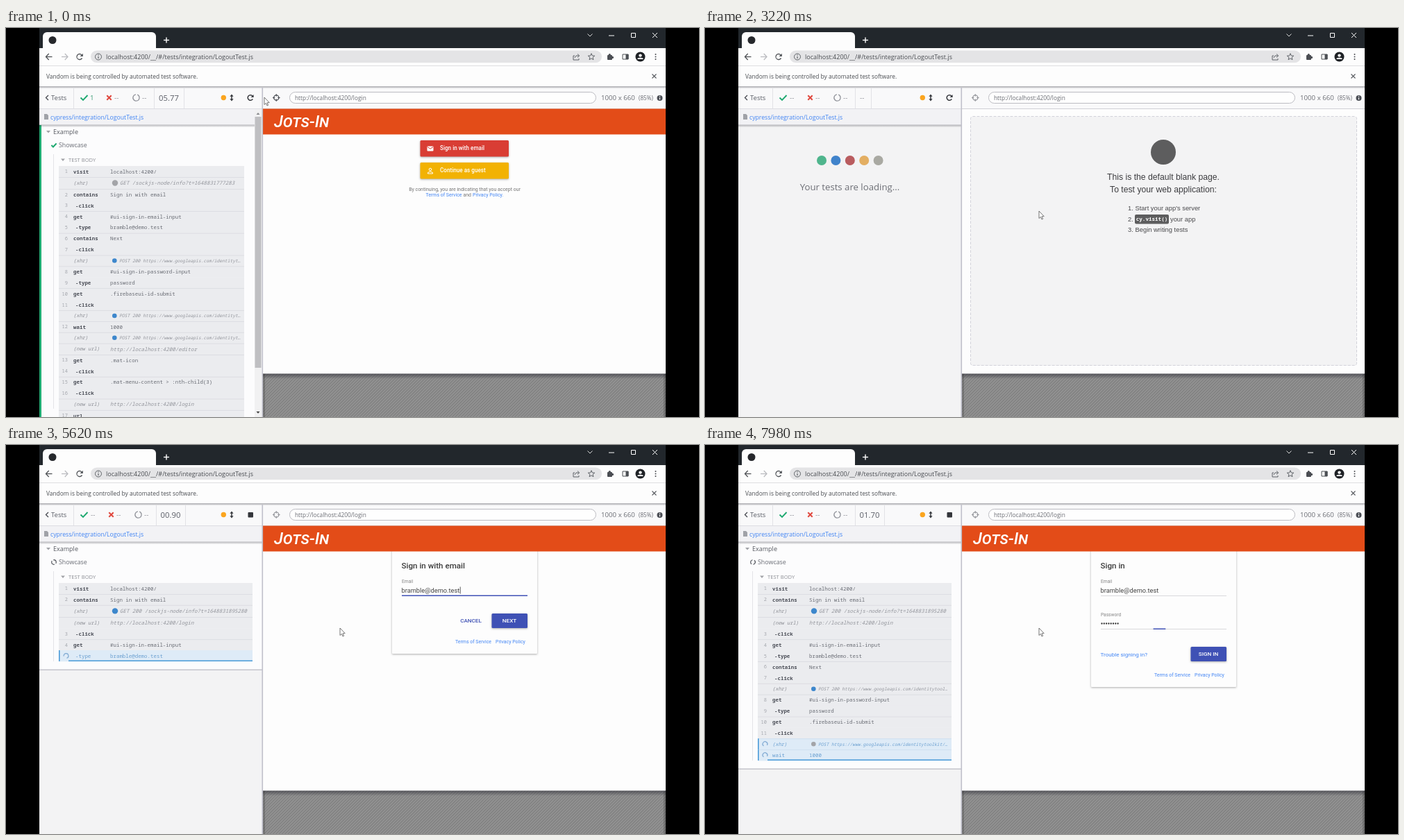
Write an HTML page with a canvas that moves like this. It is 998 px wide and 561 px high and loops after 8000 ms.

```html
<!DOCTYPE html>
<html lang="en">
<head>
<meta charset="utf-8">
<title>Test runner</title>
<style>
html, body { margin: 0; width: 100%; height: 100%; overflow: hidden; background: #000; }
canvas { display: block; }
</style>
</head>
<body>
<canvas id="stage" width="998" height="561"></canvas>
<script>
const c = document.getElementById('stage').getContext('2d');
const LOOP = 8000, HOVER = 1350, RELOAD = 2280, START = 3720, LOADED = 4700, FORM = 4950, PASSWORD = 7000;
const UI = '"Open Sans", sans-serif', WEB = 'Roboto, sans-serif', MONO = '"Noto Sans Mono", monospace',
      ARIAL = '"Liberation Sans", sans-serif';
const MAIL = 'bramble@demo.test', LINK = '#4285f4', INDIGO = '#3f51b5', GREY = '#8b8d94', INK = '#50535a';
const API = 'https://www.googleapis.com/identityt';

const clamp = v => Math.max(0, Math.min(1, v));
const span = (t, a, b) => clamp((t - a) / (b - a));
const mix = (a, b, p) => a + (b - a) * p;
const easeOut = p => 1 - (1 - p) ** 2;

// Drawing helpers; text is placed by its vertical centre.
function text(s, x, y, size, color = INK, font = UI, style = '', align = 'left') {
  c.font = `${style} ${size}px ${font}`;
  c.fillStyle = color;
  c.textAlign = align;
  c.fillText(s, x, y + size * .36);
}
function rect(x, y, w, h, color, r = 0, border) {
  c.beginPath();
  c.roundRect(x, y, w, h, r);
  if (color) { c.fillStyle = color; c.fill(); }
  if (border) { c.strokeStyle = border; c.lineWidth = 1; c.stroke(); }
}
function line(points, color, width = 1, fill) {
  c.beginPath();
  for (let i = 0; i < points.length; i += 2) c.lineTo(points[i], points[i + 1]);
  if (fill) { c.closePath(); c.fillStyle = fill; c.fill(); }
  if (color) { c.strokeStyle = color; c.lineWidth = width; c.stroke(); }
}
function disc(x, y, r, color) {
  c.beginPath(); c.arc(x, y, r, 0, 7); c.fillStyle = color; c.fill();
}
function ring(x, y, r, color, width = 1, from = 0, to = 2 * Math.PI) {
  c.beginPath(); c.arc(x, y, r, from, to); c.strokeStyle = color; c.lineWidth = width; c.stroke();
}
function fade(x, y, w, h, alpha) {
  const g = c.createLinearGradient(0, y, 0, y + h);
  g.addColorStop(0, `rgba(40,40,50,${alpha})`);
  g.addColorStop(1, 'rgba(40,40,50,0)');
  rect(x, y, w, h, g);
}
function shadowed(x, y, w, h, color, r) {
  c.save();
  c.shadowColor = 'rgba(0,0,0,.32)'; c.shadowBlur = 3; c.shadowOffsetY = 1;
  rect(x, y, w, h, color, r);
  c.restore();
}
const check = (x, y, s) => line([x - s, y, x - s * .3, y + s * .7, x + s, y - s * .7], '#1fa971', 1.9);
const cross = (x, y, s, color, w) => {
  line([x - s, y - s, x + s, y + s], color, w);
  line([x - s, y + s, x + s, y - s], color, w);
};
const caret = (x, y) => line([x - 3, y - 1.5, x + 3, y - 1.5, x, y + 2], null, 0, '#a2a3a8');
function reload(x, y, r, color, w = 1.3) {
  ring(x, y, r, color, w, .5, 5.6);
  line([x + r + .8, y - r - .8, x + r + .8, y - .4, x + .6, y - .4], null, 0, color);
}

function browser() {
  rect(48, 0, 902, 30, '#22272c');
  rect(53, 6, 163, 30, '#fdfdfd', 6);
  disc(67, 17.5, 5.5, '#26282c');
  line([227, 17.5, 235, 17.5], '#fff', 1.4);
  line([231, 13.5, 231, 21.5], '#fff', 1.4);
  line([837.5, 8.5, 841, 12, 844.5, 8.5], '#ddd');
  line([868, 11, 876, 11], '#fff');
  rect(900.5, 7.5, 6, 6, null, 0, '#fff');
  cross(934.5, 10.5, 3.5, '#fff');
  rect(48, 29, 902, 56, '#fdfdfd');
  rect(122, 32.5, 736, 17.5, '#e4e4e6', 8.7);
  line([48, 54.5, 950, 54.5], '#dedee1');
  for (const [x, d, color] of [[62, 1, '#505357'], [84.5, -1, '#bbbcc0']]) {
    line([x - 4.5, 41.5, x + 4.5, 41.5], color, 1.3);
    line([x - .3 * d, 37, x - 4.5 * d, 41.5, x - .3 * d, 46], color, 1.3);
  }
  reload(106, 41.5, 4, '#505357');
  ring(133, 41.5, 4.5, '#5f6368');
  line([133, 41, 133, 44], '#5f6368', 1.2);
  line([133, 38.6, 133, 39.8], '#5f6368', 1.2);
  text('localhost:4200/__/#/tests/integration/LogoutTest.js', 144, 41.5, 9, '#4a4d52');
  line([819, 40, 817, 40, 817, 46, 825, 46, 825, 44], '#5f6368');
  line([819, 43, 821, 40, 825.5, 40], '#5f6368');
  line([823, 37.5, 825.7, 40, 823, 42.5], '#5f6368');
  const star = Array.from({ length: 22 }, (_, i) => {
    const k = i >> 1, a = k * Math.PI / 5 - Math.PI / 2, r = k % 2 ? 2.2 : 5;
    return i % 2 ? 41.7 + r * Math.sin(a) : 843 + r * Math.cos(a);
  });
  line(star, '#5f6368');
  rect(866, 39, 7, 7, '#4b4e53', 1);
  disc(869.3, 38.6, 1.6, '#4b4e53');
  disc(873.5, 42.4, 1.6, '#4b4e53');
  rect(888, 38, 8, 7, null, 0, '#4b4e53');
  rect(892.5, 38, 4, 7, '#4b4e53');
  disc(913.5, 41.5, 7, '#1f2226');
  disc(913.5, 39.6, 2.2, '#fff');
  c.beginPath(); c.ellipse(913.5, 45, 4.2, 2.2, 0, Math.PI, 0); c.fillStyle = '#fff'; c.fill();
  for (const y of [38, 41.5, 45]) disc(935.5, y, 1, '#4b4e53');
  text('Vandom is being controlled by automated test software.', 58, 69.5, 8.4, '#4a4d52');
  cross(933.5, 69.5, 3, '#55585d', 1.1);
}

function clockText(t) {
  const keys = [[START, 0], [4320, .2], [5620, .9], [6700, 1.3], [7980, 1.7], [LOOP, 1.71]];
  const i = keys.findIndex(([time]) => time > t) || 1;
  const [a, b] = [keys[i - 1], keys[i]];
  const tenths = Math.floor(10 * mix(a[1], b[1], span(t, a[0], b[0])) + 1e-6);
  return `0${Math.floor(tenths / 10)}.${tenths % 10}0`;
}

function toolbar(t) {
  const done = t < RELOAD, loading = t >= RELOAD && t < START;
  rect(48, 85, 902, 32, '#f9f9fa');
  fade(48, 84, 902, 3.5, .4);
  line([61, 97, 57.5, 100.5, 61, 104], '#4b4e55', 1.4);
  text('Tests', 65, 100.5, 9.5, '#5a5d66');
  const shift = done ? 0 : 3;
  check(112.5, 100.5, 5);
  text(done ? '1' : '--', done ? 121 : 122, 100.5, 9.8, done ? '#3f9f78' : GREY);
  cross(148.5 + shift, 100.5, 3.2, '#e0483e', 2);
  text('--', 156 + shift, 100.5, 9.8, GREY);
  ring(187.5 + shift, 100.5, 4.6, '#94969d', 1.4, -1.2, 4.6);
  text('--', 196 + shift, 100.5, 9.8, GREY);
  if (loading) text('--', 223, 100.5, 9.8, GREY);
  else text(done ? '05.77' : clockText(t), done ? 220 : 222.5, 100.5, 11.3, '#5a5d66');
  for (const x of [97.5, done ? 213.5 : 216.5, loading ? 239.5 : done ? 256.5 : 258.5])
    line([x, 87, x, 116], '#e2e2e6');
  disc(313.3, 100.5, 3.7, '#fba51f');
  line([325, 97, 325, 104], '#34363b', 1.5);
  line([322.4, 98.8, 325, 95.4, 327.6, 98.8], null, 0, '#34363b');
  line([322.4, 102.2, 325, 105.6, 327.6, 102.2], null, 0, '#34363b');
  if (t >= HOVER && done) rect(336, 86, 33, 30, '#e9e9ed');
  if (t < START) reload(352, 100.5, 3.8, '#34363b', 1.5);
  else rect(348.5, 97, 7.5, 7.5, '#34363b', 1);

  const aim = done ? '#4b4e55' : '#96989d';
  ring(389.3, 100.5, 3.6, aim, 1.3);
  for (const [x, y] of [[1, 0], [-1, 0], [0, 1], [0, -1]])
    line([389.3 + 2 * x, 100.5 + 2 * y, 389.3 + 5.3 * x, 100.5 + 5.3 * y], aim, 1.2);
  rect(408.5, 92.5, 441, 16, '#fefefe', 8, '#bcbcc2');
  const atRoot = t >= START && t < 4850;
  text('http://localhost:4200/' + (atRoot ? '' : 'login'), 416, 100.5, 8.35, '#6b6d74');
  if (t >= START && t < LOADED) {
    rect(798, 92.5, 55, 16, '#ececef', [0, 8, 8, 0], '#c3c3c9');
    text('...loading', 801, 100.5, 8, '#5a5d66');
    for (let i = 0; i < 8; i++) {
      const a = i * Math.PI / 4 + t / 400;
      disc(842 + 3.8 * Math.cos(a), 100.5 + 3.8 * Math.sin(a), .5 + i * .09, '#5a5d66');
    }
  }
  text('1000 x 660', 857, 100.5, 9.7, '#6b6d74');
  text('(85%)', 911, 101, 8.2, '#6b6d74');
  disc(941.5, 101, 4, '#4b4e55');
  line([941.5, 100.5, 941.5, 103.3], '#fff', 1.2);
  line([941.5, 98.2, 941.5, 99.4], '#fff', 1.2);
}

// Command rows: number, name, message, start, end, message while running.
const finished = [
  [1, 'visit', 'localhost:4200/'], ['', '(xhr)', 'GET /sockjs-node/info?t=1648831777283'],
  [2, 'contains', 'Sign in with email'], [3, '-click'], [4, 'get', '#ui-sign-in-email-input'],
  [5, '-type', MAIL], [6, 'contains', 'Next'], [7, '-click'], ['', '(xhr)', `POST 200 ${API}…`],
  [8, 'get', '#ui-sign-in-password-input'], [9, '-type', 'password'], [10, 'get', '.firebaseui-id-submit'],
  [11, '-click'], ['', '(xhr)', `POST 200 ${API}…`], [12, 'wait', '1000'], ['', '(xhr)', `POST 200 ${API}…`],
  ['', '(new url)', 'http://localhost:4200/editor'], [13, 'get', '.mat-icon'], [14, '-click'],
  [15, 'get', '.mat-menu-content > :nth-child(3)'], [16, '-click'],
  ['', '(new url)', 'http://localhost:4200/login'], [17, 'url'],
];
const running = [
  [1, 'visit', 'localhost:4200/', 3800, LOADED], [2, 'contains', 'Sign in with email', 4720, 4850],
  ['', '(xhr)', 'GET 200 /sockjs-node/info?t=1648831895280', 4780, 4800],
  ['', '(new url)', 'http://localhost:4200/login', 4860, 4860], [3, '-click', '', 4900, 4980],
  [4, 'get', '#ui-sign-in-email-input', 5000, 5070], [5, '-type', MAIL, 5080, 5690],
  [6, 'contains', 'Next', 5740, 5840], [7, '-click', '', 5850, 5980],
  ['', '(xhr)', `POST 200 ${API}ool…`, 5980, 6960, 'POST --- /identitytoolkit/v3/relyingpart…'],
  [8, 'get', '#ui-sign-in-password-input', 6030, 7050], [9, '-type', 'password', 7080, 7440],
  [10, 'get', '.firebaseui-id-submit', 7480, 7560], [11, '-click', '', 7580, 7700],
  ['', '(xhr)', '', 7720, 9000, `POST ${API}oolkit/…`], [12, 'wait', '1000', 7780, 9000],
];
const message = (row, t) => t < row[4] && row[5] || row[2] || '';
const isSmall = (row, t) => row[1] === '(xhr)' && message(row, t).includes('https:');
function rowHeight(row, t) {
  if (row[1] === '(new url)') return 16.3;
  return row[1] === '(xhr)' && !isSmall(row, t) ? 17.2 : 15.9;
}

function commandRow(row, top, height, right, t, last) {
  const [n, name, , , end = 0] = row, y = top + height / 2, width = right - 76;
  const busy = t < end, event = name[0] === '(', child = name[0] === '-';
  rect(76, top, width, height + .3, busy ? '#deebf7' : '#ebecef');
  if (!child && n !== 1) line([76, top + .5, right, top + .5], busy ? '#cfdfee' : '#dcdde2');
  if (busy) {
    rect(76, top, 1.6, height, '#4a9bd8');
    ring(86.5, y, 3.4, '#7fa9d2', 1.2, t / 200, t / 200 + 4.6);
    if (last) rect(90, top + height - 1.5, right - 90, 1.5, '#4a9bd8');
  } else text(n, 89, y, 7, '#a4a6ad', MONO, '', 'right');
  const blue = '#6a9fd0', body = message(row, t), small = isSmall(row, t);
  text(name, child ? 100 : 97, y, event ? 7 : 7.45, busy ? blue : event ? GREY : '#4c4f58', MONO,
       event ? 'italic' : busy ? '500' : '600');
  let x = 150;
  if (name === '(xhr)') {
    x = small ? 163 : 164;
    disc(small ? 156.3 : 157, y, small ? 3.3 : 4.2, busy || body.startsWith('GET /') ? '#a3a4a8' : '#3d87cc');
  }
  text(body, x, y, small ? 6.33 : 7.45, busy ? blue : event ? '#92949b' : '#6a6d75', MONO, event ? 'italic' : '');
}

function sidebar(t) {
  const done = t < RELOAD, loading = t >= RELOAD && t < START;
  const rows = done ? finished : running.filter(row => t >= row[3]);
  rect(48, 117, 321, 444, '#f3f3f4');
  if (loading) {
    ['#4fb58d', '#4083cb', '#b95c5f', '#e3ae62', '#a9a9a2'].forEach((color, i) => disc(168 + i * 20.4, 191, 7, color));
    text('Your tests are loading...', 208.5, 229.5, 13.2, '#6c6e75', UI, '', 'center');
  } else {
    const top = 199, end = rows.reduce((y, row) => y + rowHeight(row, t), top);
    const bottom = done ? 561 : end + 12;
    rect(48, 140, 321, bottom - 140, '#fcfcfd');
    if (!done) rect(48, bottom - .5, 321, 1.5, '#c4c4cc');
    caret(61, 149.5);
    text('Example', 68, 149.5, 9, '#55585f');
    if (done) check(69, 169, 3.6);
    else {
      const a = t / 330;
      ring(69, 169, 3.3, '#55585f', 1.2, a, a + 2.4);
      ring(69, 169, 3.3, '#55585f', 1.2, a + 3.14, a + 5.54);
    }
    text('Showcase', 76, 169, 8.9, '#6b6e76');
    line([68.5, 182, 68.5, Math.min(561, bottom - 12)], '#e4e4e8');
    caret(82, 190);
    text('TEST BODY', 90, 190.5, 7.6, '#8b8d94');
    let y = top;
    rows.forEach((row, i) => {
      const height = rowHeight(row, t);
      commandRow(row, y, height, done ? 343 : 355, t, i === rows.length - 1);
      y += height;
    });
  }
  if (done) {
    rect(48, 140, 3, 421, '#1fa971');
    rect(358, 117, 10, 444, '#f1f1f2');
    rect(358.5, 128, 9, 362, '#bfbfc2');
    line([360.5, 125, 363, 122, 365.5, 125], null, 0, '#88898d');
    line([360.5, 553, 363, 556, 365.5, 553], null, 0, '#444');
  }
  rect(48, 117, done ? 310 : 321, 23, '#f2f2f5');
  line([48, 116.5, 369, 116.5], '#dddde2');
  fade(48, 139.5, done ? 310 : 321, 4, .33);
  line([55, 124, 59, 124, 61, 126, 61, 132, 55, 132], null, 0, '#a0a2a8');
  text('cypress/integration/LogoutTest.js', 64, 128.5, 8.7, LINK);
  rect(368.5, 86, 1.6, 475, '#bfbfca');
}

function blankPage() {
  rect(382.5, 128, 556, 359, '#f3f3f4', 3);
  c.setLineDash([4, 2]);
  rect(382.5, 127.5, 556, 359, null, 3, '#d2d2da');
  c.setLineDash([]);
  disc(660, 179, 18, '#5d5d5e');
  text('This is the default blank page.', 660, 214.3, 12.2, '#3d3d40', ARIAL, '', 'center');
  text('To test your web application:', 660, 232.3, 12.2, '#3d3d40', ARIAL, '', 'center');
  ["Start your app's server", '', 'Begin writing tests'].forEach((s, i) => {
    text(`${i + 1}.`, 609, 260 + i * 15.3, 9.35, '#4a4a4d', ARIAL);
    text(s, 619.5, 260 + i * 15.3, 9.35, '#4a4a4d', ARIAL);
  });
  rect(619, 269, 49, 13.5, '#5d5d5e', 2);
  text('cy.visit()', 643.5, 275.3, 7.6, '#fff', MONO, 'bold', 'center');
  text('your app', 670, 275.3, 9.35, '#4a4a4d', ARIAL);
}

function chooser() {
  for (const [y, color, label] of [[162, '#d93d34', 'Sign in with email'], [194, '#f2b203', 'Continue as guest']]) {
    shadowed(596.5, y, 127.5, 23.5, color, 1.5);
    text(label, 625, y + 11.5, 8.15, '#fff', WEB, '500');
  }
  rect(606.5, 170.5, 9, 7, '#fff', 1);
  line([607, 171.5, 611, 174.3, 615, 171.5], '#d93d34');
  ring(611, 204, 1.8, '#fff');
  line([607.5, 210, 607.5, 208.5, 611, 207, 614.5, 208.5, 614.5, 210, 607.5, 210], '#fff');
  text('By continuing, you are indicating that you accept our', 660.5, 232, 6.96, '#757575', WEB, '', 'center');
  text('Terms of Service', 604.5, 240.5, 6.96, LINK, WEB);
  text('and', 658.5, 240.5, 6.96, '#757575', WEB);
  text('Privacy Policy.', 672, 240.5, 6.96, LINK, WEB);
}

// Text field whose underline grows on focus and shrinks back on blur.
function field(label, value, y, t, focus, blur) {
  text(label, 570, y - 12.5, 6.6, '#858585', WEB);
  text(value, 569.5, y, 9.28, '#444', WEB);
  line([570, y + 8, 751, y + 8], '#d9d9dc');
  if (t < focus || t > blur + 460) return;
  const open = t < blur ? easeOut(span(t, focus, focus + 250)) : 1 - easeOut(span(t, blur, blur + 460));
  const left = mix(651, 570, open), right = mix(657, 751, open);
  rect(left, y + 7, right - left, 1.5, INDIGO);
  if (t < blur) {
    c.font = `9.28px ${WEB}`;
    rect(570 + c.measureText(value).width, y - 5, .8, 10, '#333');
  }
}
function signIn(t) {
  const second = t >= PASSWORD, drop = second ? 48 : 0;
  shadowed(556, 150, 209, 151 + drop, '#fdfdfd', 1);
  text(second ? 'Sign in' : 'Sign in with email', 569.5, 174, 11.6, '#3c3c3c', WEB, '500');
  const typed = (s, a, b) => s.slice(0, Math.ceil(s.length * span(t, a, b)));
  field('Email', typed(MAIL, 5110, 5560), 209.5, t, 5020, 5900);
  if (second) {
    field('Password', '', 257.5, t, 7040, 7640);
    for (let i = 0; i < typed('password', 7110, 7400).length; i++) disc(571.5 + i * 3.3, 257.5, 1.15, '#333');
    text('Trouble signing in?', 569.5, 302, 8.1, LINK, WEB);
  } else text('CANCEL', 669.5, 253.5, 8.1, INDIGO, WEB, '500', 'center');
  shadowed(699.5, 243 + drop, 51.5, 21, INDIGO, 1.5);
  text(second ? 'SIGN IN' : 'NEXT', 725, 253.3 + drop, 8.1, '#fff', WEB, '500', 'center');
  text('Terms of Service', 647, 283 + drop, 6.96, LINK, WEB);
  text('Privacy Policy', 705, 283 + drop, 6.96, LINK, WEB);
}

function preview(t) {
  c.save();
  c.beginPath(); c.rect(370, 116, 580, 445); c.clip();
  rect(370, 498, 580, 63, '#939393');
  for (let x = 306; x < 950; x += 4.3) line([x, 562, x + 64, 498], '#808080', 1.3);
  fade(370, 498, 580, 8, .6);
  rect(370, 498, 3, 63, 'rgba(40,40,40,.25)');
  rect(947, 498, 3, 63, 'rgba(40,40,40,.25)');
  rect(370, 117, 580, 381.5, '#fdfdfd');
  line([370, 116.5, 950, 116.5], '#d0d0d6');
  if (t >= RELOAD && t < START) blankPage();
  else if (t < RELOAD || t >= LOADED) {
    if (t >= FORM) signIn(t); else chooser();
    rect(370, 116.5, 580, 37, '#e34c18');
    text('Jots-In', 386, 134.5, 24, '#fff', WEB, 'italic small-caps 500');
  }
  c.restore();
}

function tooltip() {
  line([348, 120, 352, 116, 356, 120], null, 0, '#18191c');
  rect(317, 119, 71, 17.5, '#18191c', 2);
  text('Run All Tests', 321, 127.5, 8.5, '#fff');
  rect(371.5, 121.5, 13, 12, '#3b3d42', 2);
  text('R', 378, 127.8, 7, '#fff', UI, '600', 'center');
}

function pointer(t) {
  const reach = easeOut(span(t, 1150, 1600)), leave = easeOut(span(t, 2300, 2950));
  const x = mix(mix(372, 358, reach), 481, leave), y = mix(mix(100, 98, reach), 264, leave);
  c.save();
  c.translate(x, y);
  c.lineJoin = 'round';
  if (t >= HOVER && t < RELOAD + 40) {
    const hand = new Path2D('M1 1Q2-.5 3 1V5L8 6Q8.5 6 8.3 8L7.5 13.5H2L-2 8.5Q-2 6.8 1 8.5Z');
    c.fillStyle = '#fff'; c.fill(hand);
    c.strokeStyle = '#222'; c.lineWidth = 1; c.stroke(hand);
    line([4.6, 6, 4.6, 8], '#222', .7);
    line([6.4, 6.2, 6.4, 8], '#222', .7);
  } else {
    line([0, 0, 0, 10.5, 2.4, 8.4, 4, 12, 5.6, 11.3, 4, 7.8, 7.2, 7.6, 0, 0], '#555', .8, '#fff');
  }
  c.restore();
}

function draw(now) {
  const t = now % LOOP;
  c.fillStyle = '#000';
  c.fillRect(0, 0, 998, 561);
  browser();
  toolbar(t);
  preview(t);
  sidebar(t);
  if (t >= HOVER && t < RELOAD) tooltip();
  pointer(t);
  requestAnimationFrame(draw);
}
requestAnimationFrame(draw);
</script>
</body>
</html>
```
